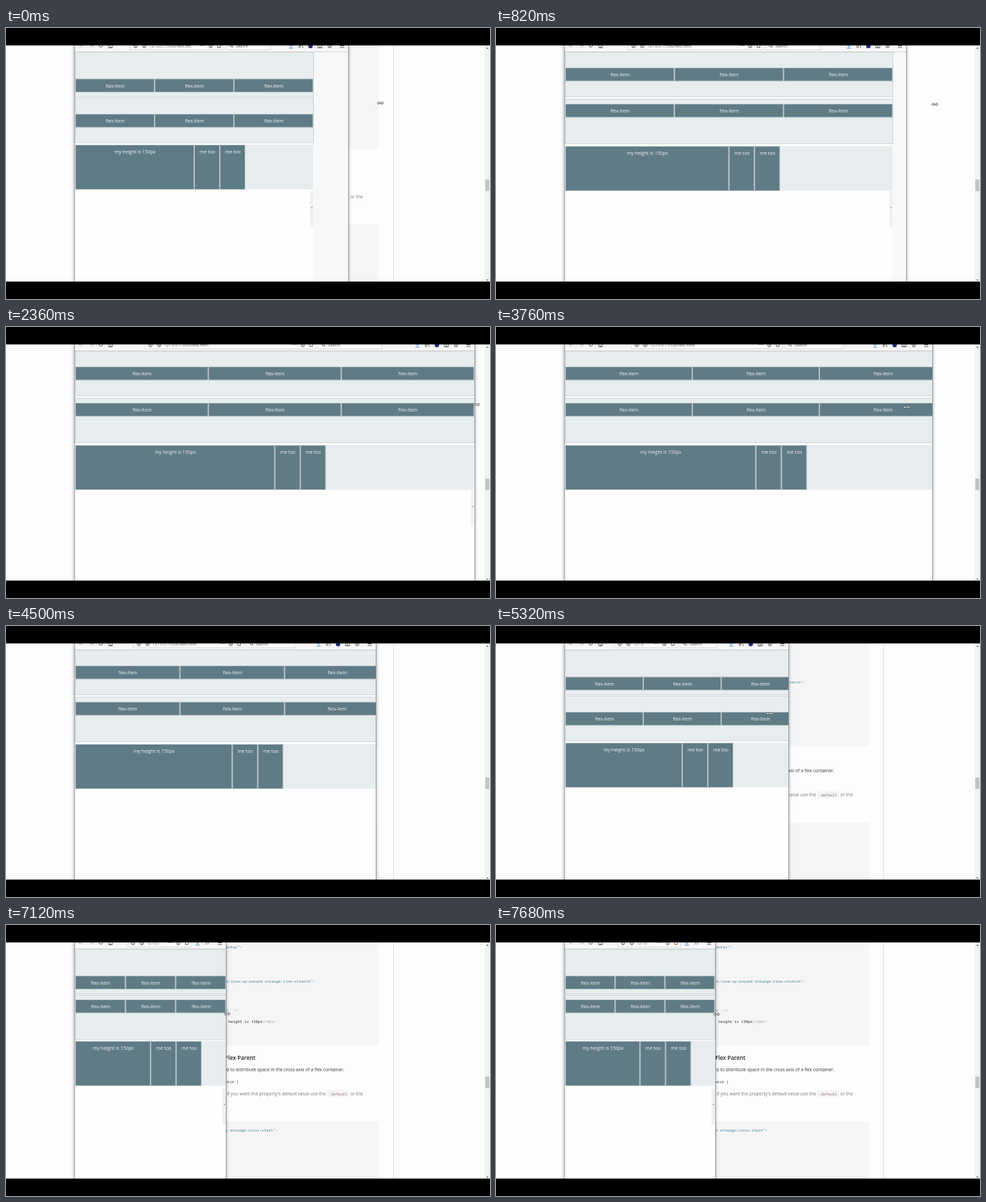
Write an HTML page that moves like this. It is 720 by 404 pixels and loops after 8 s.

```html
<!DOCTYPE html>
<html lang="en">
<head>
<meta charset="utf-8">
<title>Responsive flex demo</title>
<style>
  html, body { margin: 0; width: 100%; height: 100%; overflow: hidden; background: #000; }
  svg { display: block; width: 720px; height: 404px; }
  text { font: 7px "Open Sans", "Noto Sans", sans-serif; white-space: pre; }
  .mid { text-anchor: middle; fill: #f4f6f7; }
  .end { text-anchor: end; }
  .prose { font-size: 6.74px; fill: #333; }
  .dim { fill: #777; }
  .code { font: 5.65px "Noto Sans Mono", "DejaVu Sans Mono", monospace; fill: #3f7fa3; }
  .plain { fill: #333; }
  .tag { fill: #8c969c; }
  .head { font-size: 8.3px; font-weight: 600; fill: #222; }
  .ui { font-size: 5.8px; fill: #444; }
  .chip { fill: #f3f3f3; }
  .box { fill: #e7edee; }
  .outlined { stroke: #cdd2d3; }
  .item { fill: #5f7b86; stroke: #b3bfc5; }
  .icon { fill: none; stroke: #444; stroke-width: .9; }
  .field { fill: #fefefe; stroke: #cfcfcf; stroke-width: .8; }
</style>
</head>
<body>
<svg viewBox="0 0 720 404">
  <defs>
    <clipPath id="viewport"><rect id="viewportRect" x="102" y="26" height="352"/></clipPath>
    <clipPath id="urlClip"><rect id="urlClipRect" y="26" height="8"/></clipPath>
    <filter id="blur" x="-5%" y="-5%" width="110%" height="110%"><feGaussianBlur stdDeviation="2.6"/></filter>
  </defs>

  <rect width="720" height="404" fill="#fdfdfd"/>
  <rect x="110" y="20" width="444.5" height="160" fill="#f5f5f5"/>
  <rect x="110" y="293" width="444.5" height="90" fill="#f5f5f5"/>
  <path d="M576.5 26V378" stroke="#dedede"/>
  <g id="article"></g>

  <rect x="712" y="26" width="8" height="352" fill="#f3f3f3"/>
  <rect x="713" y="226" width="6" height="17" fill="#c3c3c3"/>
  <path d="M714.5 31l1.7-2 1.7 2zM714.5 375l1.7 2 1.7-2z" fill="#555"/>

  <rect id="shadow" x="101" y="0" height="410" fill="#333" opacity=".36" filter="url(#blur)"/>
  <g clip-path="url(#viewport)">
    <rect x="102" y="26" width="618" height="352" fill="#f8f8f8"/>
    <rect id="page" x="102" y="35" height="343" fill="#fefefe"/>
    <g id="rows"></g>
    <g id="strip">
      <rect x="-5" y="243" width="5" height="54" fill="#eef1f1"/>
      <path d="M-3.2 267.2h2.4l-1.2 1.6z" fill="#666"/>
    </g>
    <rect x="102" y="26" width="618" height="9" fill="#f7f7f8"/>
    <path d="M102 35.5H720" stroke="#d0d0d0"/>
    <g id="toolbar"></g>
  </g>
  <path id="edges" fill="none" stroke="#92959a"/>

  <g id="cursor">
    <path d="M-5 0l2.7-2.1v1.4h4.6v-1.4l2.7 2.1-2.7 2.1v-1.4h-4.6v1.4z" fill="#fff" stroke="#444" stroke-width=".7"/>
  </g>
  <path d="M0 0H720V26H0zM0 378H720V404H0z"/>
</svg>

<script>
const LOOP = 8000, LEFT = 103;

// time, window edge, edge the page was last laid out for
const STEPS = [
  [0, 509, 457], [400, 554, 538], [820, 610, 590], [1140, 650, 636],
  [1560, 682, 670], [1960, 688, 686], [2120, 693, 691], [2360, 697, 696.5],
  [2940, 697, 697], [3340, 683, 690], [3760, 649, 670], [4080, 608, 622],
  [4500, 550, 570], [4900, 490, 511], [5320, 435, 451], [5480, 404, 415],
  [5880, 360, 374], [6300, 336, 341], [6460, 330, 333], [6700, 328, 329],
  [7120, 327, 327], [7440, 326, 326], [7680, 326, 325.5], [LOOP, 325, 325]
];

// box top edges and item tops at each breakpoint
const LAYOUTS = [
  { min: 554, boxes: [36, 106, 176], items: [59.5, 113.5] },
  { min: 442, boxes: [36, 104.5, 174], items: [76, 128.5] },
  { min: 0, boxes: [36, 104.5, 173], items: [76, 111.5] }
];

const ARTICLE = [
  [351, 35, "code", 'class="center"<tspan class="tag">&gt;</tspan>'],
  [459.5, 86, "code", 'm-line-sp-around onlarge-line-stretch"<tspan class="tag">&gt;</tspan>'],
  [345, 129, "code tag", "column --&gt;"],
  [402, 146, "code plain", 'my height is 150px<tspan class="tag">&lt;/div&gt;</tspan>'],
  [371, 201, "head", "Flex Parent"],
  [503.5, 218, "prose", "Used to distribute space in the cross axis of a flex container."],
  [346, 236, "code plain", "stretch ]"],
  [476, 254, "prose dim", "if you want the property's default value use the"],
  [531, 254, "prose dim", "or the"],
  [404, 308, "code", 'stretch onlarge-cross-start"<tspan class="tag">&gt;</tspan>']
];

const $ = id => document.getElementById(id);
const rect = (cls, x, y, w, h) =>
  `<rect class="${cls}" x="${x}" y="${y}" width="${w}" height="${h}"/>`;
const text = (cls, x, y, s) => `<text class="${cls}" x="${x}" y="${y}">${s}</text>`;
const icon = (x, d, extra = "") => `<path class="icon" transform="translate(${x} 27)" d="${d}" ${extra}/>`;

const SHAPES = {
  back: "M3 0H-3L0 -2M-3 0L0 2",
  forward: "M-3 0H3L0 -2M3 0L0 2",
  reload: "M-2.5 -1A2.5 2.5 0 1 0 2.5 -1",
  home: "M-2.5 -2V2.5H2.5V-2M0 2.5V0",
  ring: "M-2.5 0A2.5 2.5 0 1 0 2.5 0A2.5 2.5 0 1 0 -2.5 0M0 -1V1.5",
  dots: "M-3 -.5H-2M-.5 -.5H.5M2 -.5H3",
  star: "M-2.4 -1L-1.6 2.5L0 1.3L1.6 2.5L2.4 -1",
  search: "M-2 -1A2 2 0 1 0 2 -1M1.3 .8L3 2.5",
  download: "M0 -2V1M-1.6 -.3L0 1.3L1.6 -.3M-3 3H3",
  books: "M-3 -2V2.6M-1 -2V2.6M1 -2L3 2.6",
  panel: "M-3 -2V2.5H3V-2M0 -2V2.5",
  more: "M-2.5 -2L-.5 0L-2.5 2M.5 -2L2.5 0L.5 2",
  menu: "M-3 -.5H3M-3 2H3"
};

$("article").innerHTML = rect("chip", 478, 246.5, 32, 10) +
  text("code", 480.5, 253.5, '<tspan fill="#8d7285">.default</tspan>') +
  ARTICLE.map(([x, y, cls, s]) => text("end " + cls, x, y, s)).join("");

function item(x, y, w, h, label) {
  return rect("item", x + .5, y, w - 1, h) + text("mid", x + w / 2 + .5, y + 12.8, label);
}

function drawRows(right) {
  const { boxes: [top, middle, bottom], items } = LAYOUTS.find(l => right >= l.min);
  const width = right - LEFT, third = width / 3, half = width / 2;
  let out = rect("box outlined", LEFT, top, width + .5, 66.5) +
    rect("box outlined", LEFT, middle, width + .5, 66.5) +
    rect("box", LEFT, bottom, width, 66.5);
  for (const y of items)
    for (let i = 0; i < 3; i++) out += item(LEFT + i * third, y, third, 19.5, "flex-item");
  const y = bottom + .5;
  return out + item(LEFT, y, half, 66, "my height is 150px") +
    item(LEFT + half, y, 38, 66, "me too") + item(LEFT + half + 38, y, 38, 66, "me too");
}

function drawToolbar(edge) {
  const wide = edge > 420, grow = edge - 435;
  const searchRight = edge - 107 - grow * .116;
  const searchLeft = searchRight - 54 - grow * .155;
  const lock = wide ? 184 + grow * .118 : 189;
  const star = wide ? searchLeft - 11 : edge - 58;
  const fade = 'style="opacity:.35"', blue = 'style="stroke:#2b7de0"';

  $("urlClipRect").setAttribute("x", lock);
  $("urlClipRect").setAttribute("width", Math.max(0, star - 30 - lock - 12));

  const out = icon(112, SHAPES.back, fade) + icon(127, SHAPES.forward, fade) +
    icon(141, SHAPES.reload) + icon(155.5, SHAPES.home) +
    rect("field", lock - 8, 20, star + 15 - lock, 12.5) +
    icon(lock, SHAPES.ring) + icon(lock + 13, SHAPES.ring) +
    `<g clip-path="url(#urlClip)">${text("ui", lock + 20.5, 29, "127.0.0.1:5500/test.html")}</g>` +
    icon(star - 25, SHAPES.dots) + icon(star - 12.5, SHAPES.ring) + icon(star, SHAPES.star) +
    icon(edge - 9, SHAPES.menu);

  if (!wide) return out + icon(edge - 42, SHAPES.download, blue) + icon(edge - 28, SHAPES.more);
  return out + rect("field", searchLeft, 20, searchRight - searchLeft, 12.5) +
    icon(searchLeft + 7, SHAPES.search) +
    text("ui dim", searchLeft + 14, 29, "Search") +
    icon(edge - 85, SHAPES.download, blue) + icon(edge - 70, SHAPES.books) +
    `<circle cx="${edge - 56}" cy="27" r="3.3" fill="#1f2f78"/>` +
    icon(edge - 42, SHAPES.panel) + icon(edge - 27.5, SHAPES.ring);
}

function cursorY(t) {
  if (t < 1560) return 112 + 3.5 * t / 1560;
  if (t < 2360) return 115.5;
  if (t < 3760) return 115.5 + 4 * (t - 2360) / 1400;
  if (t < 5320) return 119.5 + 11 * (t - 3760) / 1560;
  return 130.5 + 2.5 * (t - 5320) / 2360;
}

let shown = -1;
function render(t) {
  const next = STEPS.findIndex(s => s[0] > t);
  if (next === shown) return;
  shown = next;
  const [start, edge, right] = STEPS[next - 1];
  $("viewportRect").setAttribute("width", edge - 102);
  $("shadow").setAttribute("width", edge - 100);
  $("page").setAttribute("width", right - 102);
  $("rows").innerHTML = drawRows(right);
  $("strip").setAttribute("transform", `translate(${right} 0)`);
  $("toolbar").innerHTML = drawToolbar(edge);
  $("edges").setAttribute("d", `M102 26V378M${edge + .5} 26V378`);
  // the pointer runs one step ahead of the window edge
  $("cursor").setAttribute("transform", `translate(${STEPS[next][1] + 3} ${cursorY(start)})`);
}

const begin = performance.now();
function tick() {
  render((performance.now() - begin) % LOOP);
  requestAnimationFrame(tick);
}
tick();
</script>
</body>
</html>
```
